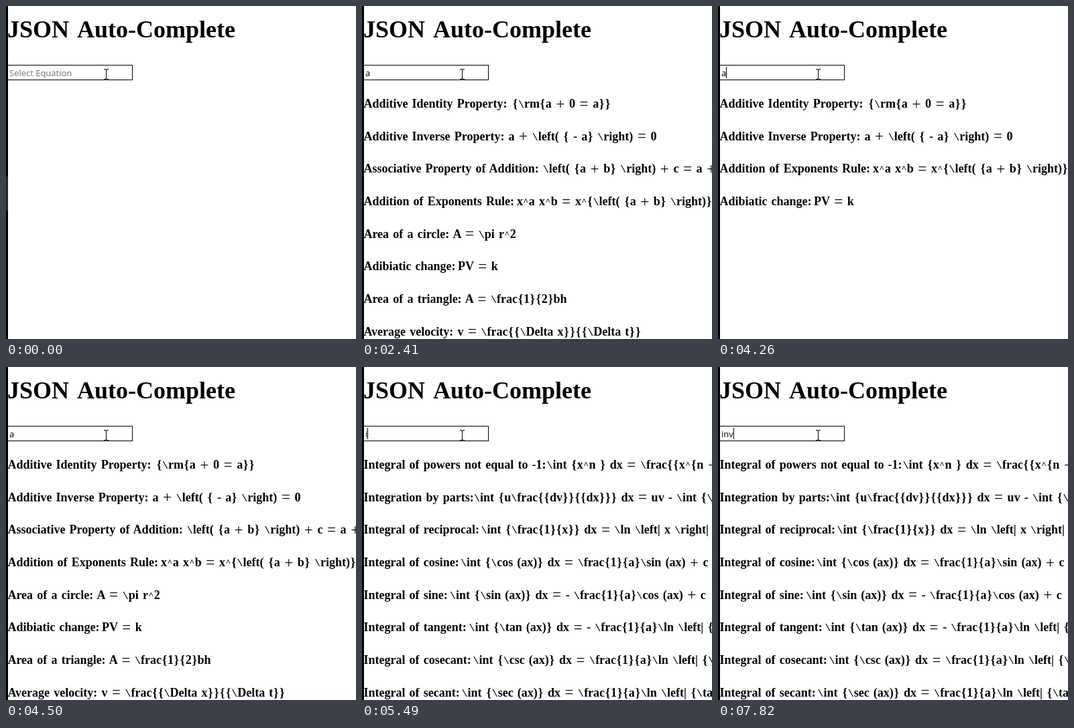
Recreate the animation shown at these times as an HTML page. Size 522 by 498 pixels, loop 8 s.

```html
<!DOCTYPE html>
<html lang="en">
<head>
<meta charset="utf-8">
<title>JSON Auto-Complete</title>
<style>
  html, body { margin: 0; width: 100%; height: 100%; overflow: hidden; background: #fff; }
  svg { display: block; width: 522px; height: 498px; }
  text { white-space: pre; }
  .serif { font: bold 18px "Liberation Serif", serif; word-spacing: 1.7px; }
  .title { font-size: 36px; word-spacing: 5px; }
  .field { font: 13px "Open Sans", "Noto Sans", sans-serif; }
  .operator { font-size: 23px; font-weight: normal; }
  .slash { font: 15px "Liberation Mono", monospace; }
  .caret { font-size: 13px; }
</style>
</head>
<body>
<svg viewBox="0 0 522 498">
  <text class="serif title" x="2" y="47">JSON Auto-Complete</text>
  <rect x=".5" y="88.5" width="188" height="22" fill="#fff" stroke="#000"/>
  <text class="field" id="hint" x="5" y="105" fill="#757575">Select Equation</text>
  <text class="field" id="typed" x="5" y="105"></text>
  <rect id="bar" y="91" width="1" height="17"/>
  <path d="M146 94h3v1h1v-1h3v1h-2l-1 1v12l1 1h2v1h-3v-1h-1v1h-3v-1h2l1-1v-12l-1-1h-2z"/>
  <g id="rows" class="serif"></g>
  <rect width="3" height="498"/>
  <rect id="scrap" x="1" y="255" width="1" height="51" fill="#555"/>
</svg>
<script>
const LOOP = 8000;
const raw = String.raw;
const $ = id => document.getElementById(id);

// name, formula, left edge of the formula (0: directly after the name)
const equations = [
  ["Additive Identity Property:", raw`{\rm{a + 0 = a}}`, 224],
  ["Additive Inverse Property:", raw`a + \left( { - a} \right) = 0`, 218.5],
  ["Associative Property of Addition:", raw`\left( {a + b} \right) + c = a + \left( {b + c} \right)`, 0],
  ["Addition of Exponents Rule:", raw`x^a x^b = x^{\left( {a + b} \right)}`, 231],
  ["Area of a circle:", raw`A = \pi r^2`, 0],
  ["Adibiatic change:", "PV = k", 143],
  ["Area of a triangle:", raw`A = \frac{1}{2}bh`, 0],
  ["Average velocity:", raw`v = \frac{{\Delta x}}{{\Delta t}}`, 0],
  ["Integral of powers not equal to -1:", raw`\int {x^n } dx = \frac{{x^{n + 1} }}{{n + 1}} + c`, 275.5],
  ["Integration by parts:", raw`\int {u\frac{{dv}}{{dx}}} dx = uv - \int {\frac{{du}}{{dx}}v} dx`, 167],
  ["Integral of reciprocal:", raw`\int {\frac{1}{x}} dx = \ln \left| x \right| + c`, 177.5],
  ["Integral of cosine:", raw`\int {\cos (ax)} dx = \frac{1}{a}\sin (ax) + c`, 147],
  ["Integral of sine:", raw`\int {\sin (ax)} dx = - \frac{1}{a}\cos (ax) + c`, 131],
  ["Integral of tangent:", raw`\int {\tan (ax)} dx = - \frac{1}{a}\ln \left| {\cos (ax)} \right| + c`, 159.5],
  ["Integral of cosecant:", raw`\int {\csc (ax)} dx = \frac{1}{a}\ln \left| {\csc (ax) - \cot (ax)} \right| + c`, 165.5],
  ["Integral of secant:", raw`\int {\sec (ax)} dx = \frac{1}{a}\ln \left| {\tan (ax) + \sec (ax)} \right| + c`, 148.5]
];

// time, typed text, caret shown, query behind the list
const steps = [
  [0, "", 0, ""], [870, "", 1, ""], [1370, "", 0, ""],
  [1920, "a", 1, ""], [2040, "a", 1, "a"], [2410, "a", 0, "a"],
  [2810, "ad", 1, "a"], [2870, "ad", 1, "ad"], [3000, "add", 1, "ad"],
  [3120, "addi", 1, "add"], [3460, "addi", 0, "add"],
  [3890, "add", 1, "add"], [3980, "ad", 1, "add"], [4070, "ad", 1, "ad"],
  [4200, "a", 1, "ad"], [4330, "a", 1, "a"], [4500, "a", 0, "a"],
  [4870, "", 1, ""], [5060, "", 0, ""],
  [5430, "i", 1, ""], [5490, "i", 1, "i"], [5610, "in", 1, "i"],
  [5660, "in", 1, "in"], [5920, "inv", 1, "in"],
  [6110, "inv", 0, "in"], [6600, "inv", 1, "in"],
  [7030, "inve", 1, "in"], [7280, "inver", 1, "in"],
  [7650, "inve", 1, "in"], [7820, "inv", 1, "in"]
];

// class, side padding and drop of the wider math glyphs
const glyphs = {
  "+": ["operator", .4, 1.6], "=": ["operator", .4, 1.6],
  "\\": ["slash", 0, 0],
  "{": ["", .9, 0], "}": ["", .9, 0],
  "^": ["caret", .6, -2]
};

function add(parent, tag, attrs, content = "") {
  const node = document.createElementNS("http://www.w3.org/2000/svg", tag);
  for (const key in attrs) node.setAttribute(key, attrs[key]);
  node.textContent = content;
  return parent.appendChild(node);
}

function addRow([name, formula, left], i) {
  const line = add($("rows"), "text", { x: 2.4, y: 152 + i * 48.67 });
  add(line, "tspan", {}, name + " ");
  let gap = 0, level = 0;
  formula.match(/[+=\\{}^]|[^+=\\{}^]+/g).forEach((part, n) => {
    const [cls, pad, drop] = glyphs[part] || ["", 0, 0];
    const attrs = { class: cls, dx: gap + pad, dy: drop - level };
    if (!n && left) attrs.x = left;
    add(line, "tspan", attrs, part);
    gap = pad;
    level = drop;
  });
}

function showList(query) {
  $("rows").textContent = "";
  if (!query) return;
  equations.filter(([name]) => name.toLowerCase().startsWith(query))
    .forEach(addRow);
}

let current = -1, shownQuery = "";

function draw(t) {
  const index = steps.findLastIndex(step => step[0] <= t);
  $("scrap").style.display = t < 960 ? "" : "none";
  if (index === current) return;
  current = index;
  const [, typed, caret, query] = steps[index];
  $("typed").textContent = typed;
  $("hint").style.display = typed ? "none" : "";
  const width = typed ? $("typed").getComputedTextLength() : 0;
  $("bar").setAttribute("x", Math.round(5 + width));
  $("bar").style.display = caret ? "" : "none";
  if (query !== shownQuery) showList(shownQuery = query);
}

const start = performance.now();
function tick() {
  draw((performance.now() - start) % LOOP);
  requestAnimationFrame(tick);
}
tick();
</script>
</body>
</html>
```
